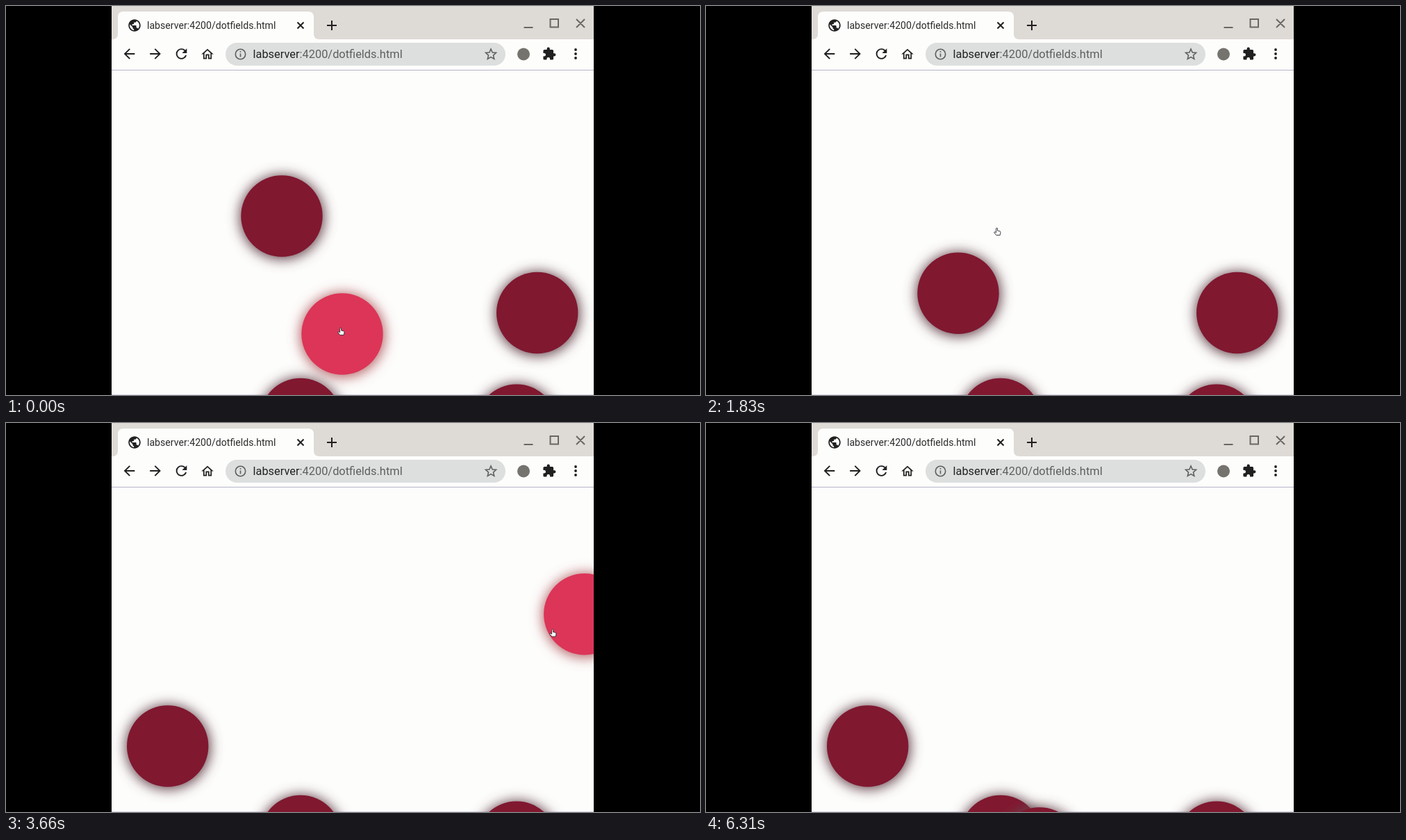
These frames come from a looping animation (999 by 561 pixels, 6520 ms). An HTML page:

```html
<!DOCTYPE html>
<html lang="en">
<head>
<meta charset="utf-8">
<title>Clickable dots</title>
<style>
  html, body { margin: 0; width: 100%; height: 100%; overflow: hidden; background: #000; }
  svg { display: block; width: 100%; height: 100%; }
  text { font-family: Roboto, sans-serif; }
  .line { fill: none; stroke-width: 2; }
  .dot { fill: #801830; }
  .shade { fill: #684650; filter: url(#blur); }
  .hover .dot { fill: #dc3558; }
  .hover .shade { fill: #b56568; }
</style>
</head>
<body>
<svg viewBox="0 0 999 561">
  <defs>
    <filter id="blur" x="-50%" y="-50%" width="200%" height="200%"><feGaussianBlur stdDeviation="9"/></filter>
    <clipPath id="window"><path d="M152 0H846V561H152z"/></clipPath>
    <clipPath id="view"><path d="M152 93H846V561H152z"/></clipPath>
  </defs>
  <g clip-path="url(#window)">
    <path fill="#fdfdfc" d="M152 0H846V561H152z"/>
    <path fill="#dedad5" d="M152 0H846V48H152z"/>
    <path fill="#fdfdfc" d="M153 48Q161 48 161 40V16Q161 8 169 8H435Q443 8 443 16V40Q443 48 451 48z"/>
    <path fill="#b6b5c9" d="M152 92H846V93H152z"/>
    <path fill="#dcdcec" d="M152 560H846V561H152z"/>
    <rect x="316" y="53" width="403" height="33" rx="16.5" fill="#dcdfdd"/>

    <text x="203" y="33" font-size="14.13" fill="#2b2b2b">labserver:4200/dotfields.html</text>
    <text x="355.5" y="75" font-size="16.4" fill="#5c605f"><tspan fill="#202222">labserver</tspan>:4200/dotfields.html</text>

    <g class="line" stroke="#202020">
      <path d="M419.5 23.5l9 9m0-9l-9 9M462 28h14m-7-7v14"/>
    </g>
    <g class="line" stroke="#696764" stroke-width="1.7">
      <path d="M745.5 31H758.500M783.500 19h11.500v11.500h-11.500zM821 19l12 12m0-12l-12 12"/>
    </g>
    <g class="line" stroke="#5b5f5e" style="stroke-width:1.6">
      <circle cx="337.500" cy="69.500" r="7.200"/>
      <path d="M337.500 68.500v5M337.500 65v1.800"/>
      <path d="M698 62l2.200 5 5.300.5-4 3.600 1.200 5.300-4.700-2.800-4.700 2.800 1.200-5.300-4-3.600 5.300-.5z"/>
    </g>
    <circle cx="745" cy="69.500" r="9" fill="#75736d"/>
    <g id="icons" fill="#202020">
      <circle cx="820" cy="63" r="1.900"/><circle cx="820" cy="69" r="1.900"/><circle cx="820" cy="75" r="1.900"/>
    </g>
    <g id="dots" clip-path="url(#view)"></g>
    <g id="hand">
      <path fill="#fff" stroke="#2c2c34" stroke-width=".9" stroke-linejoin="round"
        d="M0 .3Q1.200-.4 1.600.8V4L5 4.800Q6.200 5.200 6 6.500L5.200 10.500H-.2L-3.200 6.800Q-3.200 5.400-1.800 5.800L-.4 7V1z"/>
    </g>
    <path id="arrow" fill="#111" stroke="#fff" stroke-width=".7" d="M0 0V8.800L2 7l1.500 3.200 1.500-.7L3.600 6.500H6.200z"/>
  </g>
</svg>
<script>
const NS = "http://www.w3.org/2000/svg";
const $ = id => document.getElementById(id);

function add(parent, tag, attrs) {
  const el = parent.appendChild(document.createElementNS(NS, tag));
  for (const name in attrs) el.setAttribute(name, attrs[name]);
  return el;
}

// Toolbar icons on a 24-unit grid, placed by centre and scale
function icon(x, y, scale, d) {
  add($("icons"), "path", { d, transform: `translate(${x} ${y}) scale(${scale}) translate(-12 -12)` });
}
icon(185, 28, .87, "M12 2C6.480 2 2 6.480 2 12s4.480 10 10 10 10-4.480 10-10S17.520 2 12 2zm-1 17.930c-3.950-.49-7-3.850-7-7.930 0-.62.08-1.210.21-1.790L9 15v1c0 1.100.9 2 2 2zm6.900-2.540c-.26-.81-1-1.390-1.900-1.390h-1v-3c0-.55-.45-1-1-1H8v-2h2c.55 0 1-.45 1-1V7h2c1.100 0 2-.9 2-2v-.41c2.930 1.190 5 4.060 5 7.410 0 2.080-.8 3.970-2.100 5.390z");
const back = "M20 11H7.830l5.590-5.590L12 4l-8 8 8 8 1.410-1.410L7.830 13H20z";
icon(177.5, 69, .98, back);
icon(215, 69, -.98, back);
icon(252.5, 69, .98, "M17.650 6.350A7.960 7.960 0 0 0 12 4a8 8 0 1 0 7.730 10h-2.080A6 6 0 1 1 12 6c1.660 0 3.140.69 4.220 1.780L13 11h7V4z");
icon(290, 69.5, .87, "M12 5.690l5 4.500V18h-2v-6H9v6H7v-7.810zM12 3L2 12h3v8h6v-6h2v6h6v-8h3z");
icon(782, 69, .86, "M20.500 11H19V7c0-1.100-.9-2-2-2h-4V3.500a2.500 2.500 0 0 0-5 0V5H4c-1.100 0-2 .9-2 2v3.800h1.500a2.700 2.700 0 0 1 0 5.400H2V20c0 1.100.9 2 2 2h3.800v-1.500a2.700 2.700 0 0 1 5.400 0V22H17c1.100 0 2-.9 2-2v-4h1.500a2.500 2.500 0 0 0 0-5z");

const LOOP = 6520, RADIUS = 58.7, FADE = 3;

// x, y, step at which it starts to fade in, step at which it is clicked away
const dots = [
  [397, 303, -9, 9],
  [484, 473, -9, 1],
  [764.7, 442.5, -9, 15],
  [424, 595.5, -9, 99],
  [735, 604.3, -9, 99],
  [363, 414.3, .4, 12],
  [832.8, 275.8, 9, 24],
  [232.7, 466, 12, 99],
  [480, 613, 24, 99]
].map(([x, y, born, gone]) => {
  const el = add($("dots"), "g", { transform: `translate(${x} ${y})` });
  add(el, "circle", { class: "shade", cx: .5, cy: 1.5, r: RADIUS + 2.5 });
  add(el, "circle", { class: "dot", r: RADIUS });
  return { x, y, born, gone, el };
});

// Pointer path: step, x, y
const path = [
  [0, 481, 464], [4, 481, 464], [7, 418, 320], [9, 418, 320],
  [11, 380, 387], [12, 380, 387], [14, 760, 440], [15, 760, 440],
  [17, 786, 297.5], [22, 786, 297.5], [24, 795, 274.5], [27, 870, 240]
];

function pointer(step) {
  const i = path.findIndex(p => p[0] > step);
  if (i < 1) return i ? path[path.length - 1].slice(1) : path[0].slice(1);
  const [s0, x0, y0] = path[i - 1], [s1, x1, y1] = path[i];
  let u = (step - s0) / (s1 - s0);
  u = u * u * (3 - 2 * u);
  return [x0 + (x1 - x0) * u, y0 + (y1 - y0) * u];
}

function draw(time) {
  const t = time % LOOP;
  const step = Math.min(31, 3 * Math.floor(t / 610) + Math.min(2, Math.floor(t % 610 / 200)));
  const [x, y] = pointer(step), [px, py] = pointer(Math.max(0, step - 1));
  let over = false;
  for (const d of dots) {
    const alpha = step < d.gone ? Math.max(0, Math.min(1, (step - d.born) / FADE)) : 0;
    const hit = alpha > 0 && Math.hypot(x - d.x, y - d.y) < RADIUS;
    d.el.setAttribute("opacity", alpha);
    d.el.setAttribute("class", hit ? "hover" : "");
    over ||= hit;
  }
  const hand = over || (x === px && y === py);
  for (const [id, shown] of [["hand", hand], ["arrow", !hand]]) {
    $(id).setAttribute("transform", `translate(${x} ${y})`);
    $(id).setAttribute("visibility", shown ? "visible" : "hidden");
  }
}

const start = performance.now();
function tick() {
  draw(performance.now() - start);
  requestAnimationFrame(tick);
}
tick();
</script>
</body>
</html>
```
